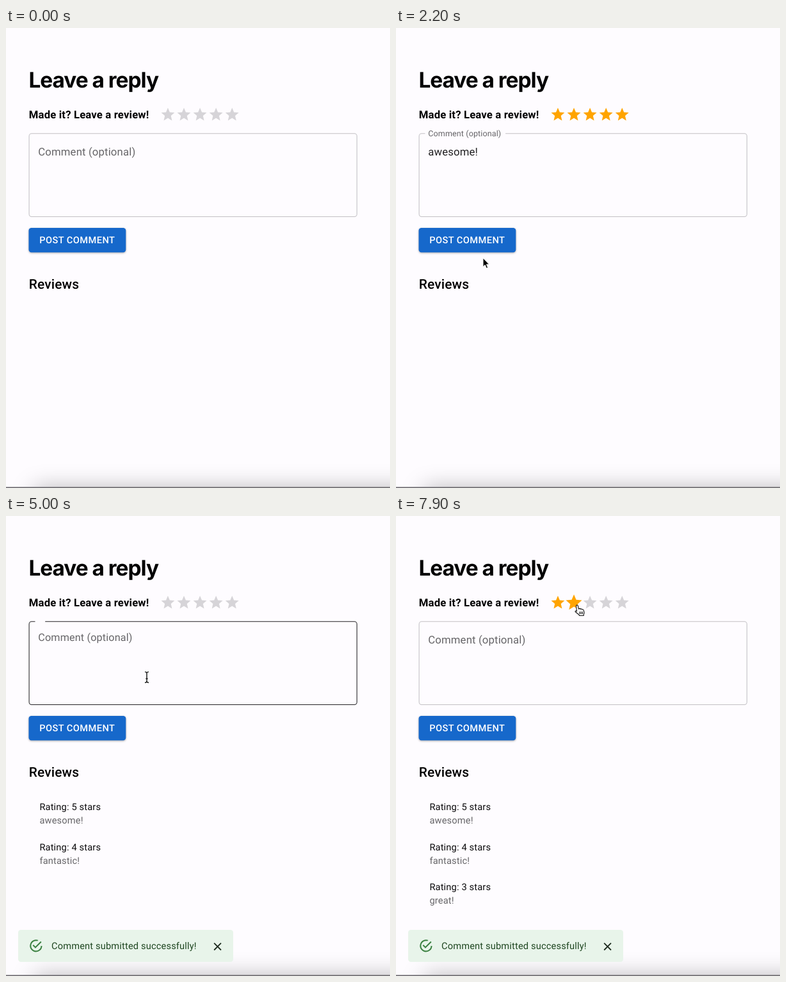
An HTML page that plays this animation: 600x718 px, repeating every 8000 ms.

```html
<!DOCTYPE html>
<html lang="en">
<head>
<meta charset="utf-8">
<title>Leave a reply</title>
<style>
  html, body { margin: 0; width: 100%; height: 100%; overflow: hidden; background: #fefcff; }
  svg { display: block; width: 100%; height: 100%; overflow: hidden; }
  text { font-family: Roboto, sans-serif; text-rendering: geometricPrecision; white-space: pre; }
  .shade { fill: rgba(0, 0, 0, .27); filter: blur(17px); }
  .title { font: 700 33.4px Inter, sans-serif; letter-spacing: -1px; }
  .body { font-size: 16.72px; letter-spacing: .00938em; }
  .small { font-size: 14.63px; letter-spacing: .0107em; }
  .strong { font-weight: 700; }
  .heading { font-size: 20.9px; font-weight: 500; letter-spacing: .0075em; }
  .action { font-size: 14.63px; font-weight: 500; letter-spacing: .02857em; fill: #fff; }
  .soft { fill: #666568; }
  #button { filter: drop-shadow(0 1.6px 1.4px rgba(0, 0, 0, .33)); }
</style>
</head>
<body>
<svg viewBox="0 0 600 718">
  <rect class="shade" x="43" y="717" width="700" height="80" rx="10"/>
  <rect y="716.4" width="600" height="1.6" fill="#6d6b70"/>
  <text class="title" x="35.4" y="93">Leave a reply</text>
  <text class="body strong" x="35.8" y="140.9">Made it? Leave a review!</text>
  <g id="stars"></g>

  <rect id="field" x="36.1" y="164.8" width="512.2" height="129.7" rx="4" fill="none"/>
  <rect id="notch" x="45.5" y="160" height="9" fill="#fefcff"/>
  <text id="label" class="body">Comment (optional)</text>
  <text id="typed" class="body" x="50.3" y="199.3" fill="#212022"></text>
  <rect id="caret" y="184" width="1.2" height="19.5" fill="#222"/>

  <rect id="button" x="35.5" y="312" width="151.8" height="38.2" rx="4.2"/>
  <text class="action" x="52.3" y="336.2">POST COMMENT</text>
  <text class="heading" x="35.7" y="407.3">Reviews</text>
  <g id="reviews"></g>

  <g id="toast">
    <rect x="19" y="646" width="336" height="50" rx="4.2" fill="#e8f4ea"/>
    <path transform="translate(35.4 659.4) scale(.958)" fill="#3a8040" d="M20 12a8 8 0 1 1-8-8c.76 0 1.5.11 2.2.31l1.57-1.57A10 10 0 1 0 22 12M7.91 10.08L6.5 11.5 11 16 21 6l-1.41-1.42L11 13.17z"/>
    <text class="small" x="71" y="676.2" fill="#1e4620">Comment submitted successfully!</text>
    <path d="M325.2 666.7l10.8 10.8m0-10.8l-10.8 10.8" stroke="#1c2b1d" stroke-width="1.8"/>
  </g>

  <g id="cursor">
    <path id="arrow" fill="#000" stroke="#fff" d="M0 0V13.8L3.1 10.8 5.3 16 7.6 15 5.4 10H9.6Z"/>
    <g id="beam" fill="none">
      <path id="beamHalo" stroke="#fff" stroke-width="3"/>
      <path id="beamLine" stroke="#111" stroke-width="1.4"/>
    </g>
    <g id="hand" stroke="#111" stroke-width="1.1" stroke-linejoin="round">
      <path fill="#fff" d="M-.6 10L-1.5 1.8A1.4 1.4 0 0 1 1.3 1.2L2.4 6.2C3 5 4.8 5.2 5.1 6.4 5.9 5.5 7.4 5.9 7.7 7 8.6 6.4 10 6.9 10.2 8.2L11 11.5Q11.2 13 10.2 14.5V16.5H3.4L2.8 15-2.6 10.8C-3.6 9.8-2.4 8.4-1.2 9.3Z"/>
      <path d="M4 10.2v4M6.2 10.2v4M8.4 10.2v4"/>
    </g>
  </g>
</svg>
<script>
const LOOP = 8000, STEP = 100, FADE = 200, TOAST_LIFE = 2800;
const BLUE = '#1668cb', BLUE_DARK = '#125ab3', GOLD = '#ffa400', EMPTY = '#d6d4d8', GREY = '#666568';
const STAR_LEFT = 240.4, STAR_PITCH = 25.08;
const BEAM = 'M-3-8.3Q0-8.3 0-6.3 0-8.3 3-8.3M0-6.3V6.3M-3 8.3Q0 8.3 0 6.3 0 8.3 3 8.3M-1.7 2.2H1.7';
const STAR = 'M0 5.27L6.18 9 4.54 1.97 10-2.76 2.81-3.37 0-10-2.81-3.37-10-2.76-4.54 1.97-6.18 9Z';

// Each round: pick stars, focus the field, type, press the button, see the post appear.
let opened = 200;
const rounds = [
  { stars: 5, comment: 'awesome!', rate: 700, post: 2300 },
  { stars: 4, comment: 'fantastic!', rate: 2700, post: 4900 },
  { stars: 3, comment: 'great!', rate: 5400, post: 7200 },
  { stars: 2, comment: '', rate: 7900, post: 9700 }
].map(r => {
  const round = { ...r, open: opened, focus: r.rate + 300, type: r.rate + 500, press: r.post - 300 };
  opened = r.post;
  return round;
});

const $ = id => document.getElementById(id);
const set = (el, attrs) => { for (const k in attrs) el.setAttribute(k, attrs[k]); };
const show = (el, on) => { el.style.display = on ? '' : 'none'; };
const add = (parent, tag, attrs, text = '') => {
  const el = document.createElementNS('http://www.w3.org/2000/svg', tag);
  set(el, attrs);
  el.textContent = text;
  return parent.appendChild(el);
};
const easeOut = k => 1 - (1 - Math.min(1, Math.max(0, k))) ** 3;
const inside = (p, x0, y0, x1, y1) => p && p.x >= x0 && p.x < x1 && p.y >= y0 && p.y < y1;
const inField = p => inside(p, 36, 165, 548, 295);
const starX = n => STAR_LEFT + STAR_PITCH * (n - .5);
const roundAt = t => rounds.find(r => t < r.post);

function glide(t, start, end, a, b) {
  const k = easeOut((t - start) / (end - start));
  return { x: a.x + (b.x - a.x) * k, y: a.y + (b.y - a.y) * k };
}

// The pointer hides at first and while typing.
function pointer(t) {
  const { stars, open, rate, focus, press } = roundAt(t);
  const star = { x: starX(stars) + 5, y: 139 };
  const field = { x: starX(stars) - 4, y: 181 };
  const button = { x: 130, y: 331 }, rest = { x: 136, y: 359 };
  if (t < open || t > focus + 100 && t <= press - 200) return null;
  if (t <= rate + 100) return glide(t, open, rate, rest, star);
  if (t <= focus + 100) return glide(t, rate + 100, rate + 200, star, field);
  if (t <= press) return glide(t, press - 200, press, field, button);
  return glide(t, press, press + 100, button, rest);
}

function hoveredStar(t) {
  const p = pointer(t);
  return inside(p, STAR_LEFT, 122, STAR_LEFT + 5 * STAR_PITCH, 148)
    ? Math.floor((p.x - STAR_LEFT) / STAR_PITCH) + 1 : 0;
}

const stars = Array.from({ length: 5 }, () => add($('stars'), 'path', { d: STAR }));
const reviews = rounds.map(({ stars, comment }, i) => {
  const g = add($('reviews'), 'g', { transform: `translate(52.4 ${458.7 + i * 62.8})` });
  add(g, 'text', { class: 'small', fill: '#0c0b0d' }, `Rating: ${stars} stars`);
  add(g, 'text', { class: 'small soft', y: 21 }, comment);
  return g;
});
set($('beamHalo'), { d: BEAM });
set($('beamLine'), { d: BEAM });

function drawStars(t, round) {
  const over = hoveredStar(t), before = hoveredStar(Math.max(0, t - STEP));
  const filled = over || (t >= round.rate ? round.stars : 0);
  stars.forEach((star, i) => {
    const n = i + 1;
    const size = 1.045 * (1 + .1 * ((over === n) + (before === n)));
    set(star, {
      fill: n <= filled ? GOLD : EMPTY,
      transform: `translate(${starX(n)} 135) scale(${size})`
    });
  });
}

function drawField(t, round, p) {
  const focused = t >= round.focus && t < round.press;
  const hovered = inField(p) && p.y > 180;
  set($('field'), {
    stroke: focused ? BLUE : hovered ? '#242326' : '#c2c0c4',
    'stroke-width': focused ? 2.1 : 1.05
  });
  const raised = t >= round.focus ? easeOut((t - round.focus) / FADE)
    : round === rounds[0] ? 0 : 1 - easeOut((t - round.open) / FADE);
  set($('notch'), { width: 125.5 * raised });
  set($('label'), {
    transform: `translate(50.3 ${199 - 30.5 * raised}) scale(${1 - .25 * raised})`,
    fill: focused ? BLUE : GREY
  });
  const letters = Math.max(0, (t - round.type) / STEP + 1);
  $('typed').textContent = round.comment.slice(0, letters);
  set($('caret'), { x: 49.9 + $('typed').getComputedTextLength() });
  show($('caret'), focused);
}

// A post made while the toast is still open does not restart it.
function drawToast(t) {
  let start = -LOOP;
  for (const { post } of rounds) if (post <= t && post > start + TOAST_LIFE) start = post;
  const age = t - start;
  const k = Math.min(easeOut(age / FADE), 1 - easeOut((age - TOAST_LIFE) / FADE));
  show($('toast'), k > 0);
  set($('toast'), {
    opacity: k,
    transform: `translate(187 671) scale(${.75 + .25 * k} ${.5625 + .4375 * k}) translate(-187 -671)`
  });
}

function drawPointer(t, p, onButton) {
  show($('cursor'), p);
  if (!p) return;
  const kind = onButton || hoveredStar(t) ? 'hand' : inField(p) ? 'beam' : 'arrow';
  for (const id of ['hand', 'beam', 'arrow']) show($(id), id === kind);
  set($('cursor'), { transform: `translate(${p.x} ${p.y})` });
}

function render(t) {
  const round = roundAt(t), p = pointer(t);
  const onButton = inside(p, 36, 312, 187, 350);
  drawStars(t, round);
  drawField(t, round, p);
  set($('button'), { fill: onButton ? BLUE_DARK : BLUE });
  reviews.forEach((g, i) => show(g, t >= rounds[i].post));
  drawToast(t);
  drawPointer(t, p, onButton);
}

const origin = performance.now();
function tick() {
  const t = (performance.now() - origin) % LOOP;
  render(Math.floor(t / STEP) * STEP);
  requestAnimationFrame(tick);
}
tick();
</script>
</body>
</html>
```
